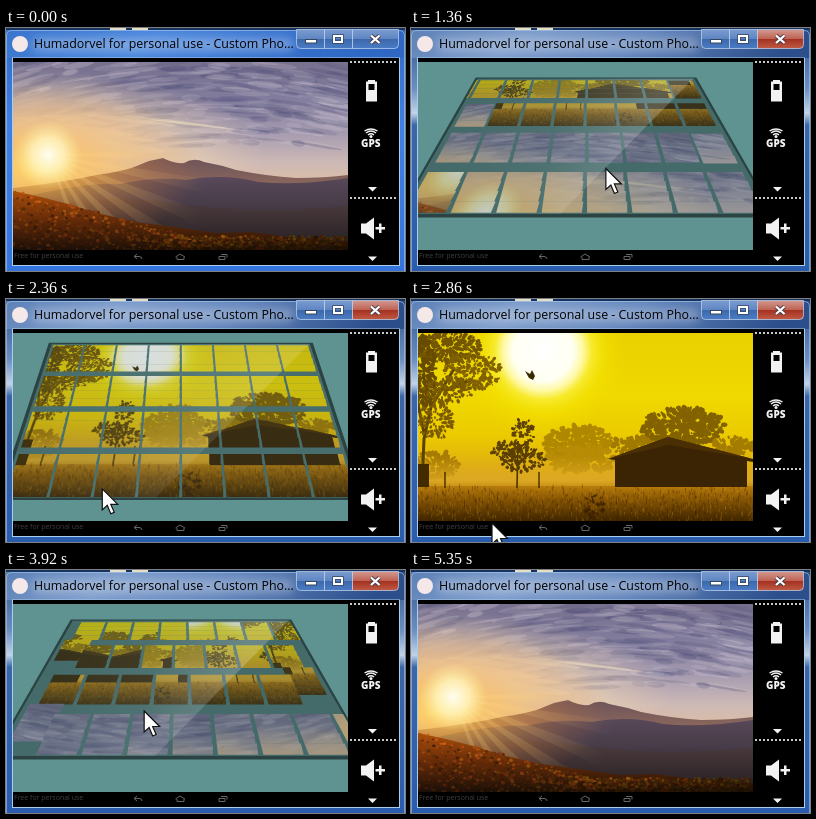
An HTML page with a canvas for the animation above (5.65 s loop, 399 by 243 pixels).

```html
<!DOCTYPE html>
<html lang="en">
<head>
<meta charset="utf-8">
<title>Tiled wallpaper switch</title>
<style>
  html, body { margin: 0; width: 100%; height: 100%; overflow: hidden; background: #000; }
  #stage { position: relative; width: 399px; height: 243px; overflow: hidden; }
  svg, canvas { position: absolute; left: 0; top: 0; display: block; }
  #screen { left: 7px; top: 34px; }
  text { font-family: "Open Sans", "Noto Sans", sans-serif; }
</style>
</head>
<body>
<div id="stage">
  <svg width="399" height="243" viewBox="0 0 399 243">
    <defs>
      <linearGradient id="calm" x2="1" y2="0.1">
        <stop offset="0" stop-color="#3a74cc"/><stop offset=".4" stop-color="#4a86dc"/>
        <stop offset=".75" stop-color="#3670cc"/><stop offset="1" stop-color="#2f68c4"/>
      </linearGradient>
      <linearGradient id="active" x2="1" y2="0.1">
        <stop offset="0" stop-color="#5c80b6"/><stop offset=".3" stop-color="#7d9ccb"/>
        <stop offset=".6" stop-color="#6486bc"/><stop offset="1" stop-color="#2c4f8c"/>
      </linearGradient>
      <linearGradient id="calmSide" x2="0" y2="1">
        <stop offset="0" stop-color="#2f69c4"/><stop offset=".4" stop-color="#3f80e6"/>
        <stop offset="1" stop-color="#3574dc"/>
      </linearGradient>
      <linearGradient id="side" x2="0" y2="1">
        <stop offset="0" stop-color="#2c4f8c"/><stop offset=".25" stop-color="#6c8fc2"/>
        <stop offset=".35" stop-color="#c3d3e8"/><stop offset=".4" stop-color="#3c66a8"/>
        <stop offset="1" stop-color="#2a5cae"/>
      </linearGradient>
      <linearGradient id="btn" x2="0" y2="1">
        <stop offset="0" stop-color="#7c9cd0"/><stop offset=".48" stop-color="#5f86c2"/>
        <stop offset=".5" stop-color="#3c68ac"/><stop offset="1" stop-color="#4a7cc4"/>
      </linearGradient>
      <linearGradient id="red" x2="0" y2="1">
        <stop offset="0" stop-color="#d39a92"/><stop offset=".48" stop-color="#bf6354"/>
        <stop offset=".5" stop-color="#a4301f"/><stop offset="1" stop-color="#bf5a44"/>
      </linearGradient>
      <filter id="soft" x="-10%" y="-100%" width="120%" height="300%"><feGaussianBlur stdDeviation="5"/></filter>
    </defs>
    <rect id="frame" width="399" height="243" fill="url(#calmSide)"/>
    <rect id="bar" width="399" height="30" fill="url(#calm)"/>
    <rect width="399" height="2" fill="#16335f"/>
    <path d="M104 1H148" stroke="#e6dfc8" stroke-width="2" stroke-dasharray="16 6"/>
    <path d="M.5 243V8Q.5 2.5 6 2.5H393Q398.500 2.500 398.500 8V243" fill="none" stroke="#a8cbf0" stroke-opacity=".6"/>
    <rect x="26" y="10" width="262" height="13" rx="6" fill="#fff" opacity=".3" filter="url(#soft)"/>
    <circle cx="14" cy="16" r="8" fill="#f4e8e8"/>
    <text x="28" y="20" font-size="12.400" fill="#000">Humadorvel for personal use - Custom Pho...</text>
    <g stroke="#c3d8f0" stroke-opacity=".7">
      <path d="M290.500 1.500H318.500V20.500H294.500Q290.500 20.500 290.500 16.500Z" fill="url(#btn)"/>
      <rect x="318.500" y="1.500" width="28" height="19" fill="url(#btn)"/>
      <path id="close" d="M346.500 1.500H392.500V16.500Q392.500 20.500 388.500 20.500H346.500Z" fill="url(#btn)"/>
    </g>
    <rect x="299.500" y="11.500" width="11" height="3.500" fill="#fff" stroke="#35465e"/>
    <rect x="328" y="8" width="8" height="6" fill="none" stroke="#35465e" stroke-width="3.500"/>
    <rect x="328" y="8" width="8" height="6" fill="none" stroke="#fff" stroke-width="2"/>
    <path d="M365 7.500l8.500 7.500m0-7.500l-8.500 7.500" stroke="#4a3c46" stroke-width="4.200"/>
    <path d="M365 7.500l8.500 7.500m0-7.500l-8.500 7.500" stroke="#fff" stroke-width="2.300"/>
    <rect x="6" y="29.500" width="388" height="208.500" fill="#a9cdec"/>
    <rect x="7" y="30" width="386" height="207" fill="#000"/>
    <path d="M344 34H392M344 170H392" stroke="#c9c9c9" stroke-width="2" stroke-dasharray="2 2"/>
    <g fill="#f2f2f2">
      <path d="M362 52h7v1.500h2v20h-11V53.500h2Z"/>
      <path d="M362 159h9l-4.500 4.500zM362 228.500h9l-4.500 4.500z"/>
      <path d="M355 195.500h5l8-6v22l-8-6h-5z"/>
      <path d="M369.500 199h3.500v-3.500h2.500v3.500h3.500v2.500h-3.500v3.500H373v-3.500h-3.500z"/>
      <circle cx="365" cy="108.500" r="1.500"/>
      <text x="364.800" y="118.500" font-size="10" font-weight="800" text-anchor="middle">GPS</text>
    </g>
    <path d="M362 107q3-2.500 6 0M360 105q5-4 10 0M358.500 103q6.500-4 13 0" fill="none" stroke="#f2f2f2" stroke-width="1.400"/>
    <rect x="362.500" y="56" width="6" height="6" fill="#000"/>
    <text x="8" y="230" font-size="7" fill="#404040">Free for personal use</text>
    <g fill="none" stroke="#666" stroke-width="1">
      <path d="M131 226l-3 2.500l3 2.500M128 228.500h5q3 0 3 2.500"/>
      <path d="M169.500 229l4.500-3l5 3M171 229v2.500h7V229"/>
      <path d="M213 228.500h6v3h-6zM215 226.500h6v3"/>
    </g>
  </svg>
  <canvas id="screen" width="335" height="188"></canvas>
  <svg width="399" height="243" viewBox="0 0 399 243">
    <path id="cursor" d="M0 0V21L5 16.500L8.500 25L12 23.500L8.500 15.500H15.500Z" fill="#fff" stroke="#111" stroke-width="1.200"/>
  </svg>
</div>
<script>
const W = 335, H = 188, LOOP = 5650, COLS = 8, TILES = 32;
const ctx = document.getElementById('screen').getContext('2d');
const lerp = (a, b, f) => a + (b - a) * f;
const $ = id => document.getElementById(id);

function rng(seed) {
  return () => (seed = (seed * 16807) % 2147483647) / 2147483647;
}

// Scenes are painted in stage coordinates.
function scene(paint) {
  const c = document.createElement('canvas');
  c.width = W; c.height = H;
  const g = c.getContext('2d');
  g.translate(-7, -34);
  paint(g);
  return c;
}
function wash(g, fill, y = 34, h = H) {
  g.fillStyle = fill;
  g.fillRect(7, y, W, h);
}
function stops(grad, list) {
  list.forEach(([o, c]) => grad.addColorStop(o, c));
  return grad;
}
const down = (g, y0, y1, list) => stops(g.createLinearGradient(0, y0, 0, y1), list);
const glow = (g, x, y, r, list) => stops(g.createRadialGradient(x, y, 0, x, y, r), list);
function blob(g, x, y, rx, ry, fill, turn = 0) {
  g.fillStyle = fill;
  g.beginPath();
  g.ellipse(x, y, rx, ry, turn, 0, 7);
  g.fill();
}
function land(g, d, fill) {
  g.fillStyle = fill;
  g.fill(new Path2D(d + 'V222H7Z'));
}
// A glow squeezed vertically around its centre.
function flare(g, x, y, r, squeeze, list) {
  g.save();
  g.translate(x, y);
  g.scale(1, squeeze);
  blob(g, 0, 0, r, r, glow(g, 0, 0, r, list));
  g.restore();
}

const sunrise = scene(g => {
  const r = rng(41), sun = [42, 127];
  wash(g, down(g, 34, 152, [[0, '#77708e'], [.3, '#817c9c'], [.6, '#a59bb0'], [.85, '#cdb9b6'], [1, '#d9bda8']]));
  for (let i = 0; i < 330; i++) {
    const x = 7 + r() * W, y = 34 + r() * 84;
    const tone = r() < .45 ? '214,204,216' : '74,74,116';
    blob(g, x, y, 7 + r() * 20, .8 + r() * 2.4, `rgba(${tone},${.1 + r() * .2})`, lerp(-.3, .22, (x - 7) / W));
  }
  for (let i = 0; i < 14; i++)
    blob(g, 20 + r() * 190, 88 + r() * 35, 25 + r() * 35, 1 + r() * 3, 'rgba(255,240,205,.3)', .12);
  flare(g, 45, 125, 215, .36, [[0, '#fffdf0'], [.3, 'rgba(255,247,218,.95)'], [.6, 'rgba(255,229,184,.5)'], [1, 'rgba(255,215,170,0)']]);
  flare(g, 30, 100, 125, .5, [[0, 'rgba(255,240,205,.5)'], [1, 'rgba(255,220,170,0)']]);
  land(g, 'M7 160Q60 154 90 147Q120 143 133 137L143 133L157 130Q168 136 178 135Q188 129 198 134Q215 137 230 142Q260 148 290 150Q320 150 342 147', down(g, 130, 190, [[0, '#6b525a'], [.5, '#8f6a5c'], [1, '#735347']]));
  land(g, 'M7 172Q75 154 115 156Q148 148 180 152Q218 145 252 154Q292 158 342 150', down(g, 148, 215, [[0, '#59485a'], [.4, '#483d49'], [1, '#29242b']]));
  land(g, 'M7 182Q90 164 160 174Q240 187 342 178', down(g, 166, 222, [[0, 'rgba(82,62,62,.7)'], [1, '#231e22']]));
  flare(g, 30, 140, 165, .5, [[0, 'rgba(255,214,98,.95)'], [.35, 'rgba(240,165,62,.62)'], [.7, 'rgba(205,125,60,.3)'], [1, 'rgba(190,110,60,0)']]);
  for (let i = 0; i < 7; i++) {
    const a = -.05 + i * .2;
    g.fillStyle = glow(g, ...sun, 165, [[0, 'rgba(255,224,130,.3)'], [1, 'rgba(255,200,110,0)']]);
    g.beginPath();
    g.moveTo(...sun);
    g.arc(...sun, 165, a, a + .09);
    g.fill();
  }
  blob(g, ...sun, 34, 34, glow(g, ...sun, 34, [[0, '#fffef2'], [.5, 'rgba(255,246,190,.8)'], [1, 'rgba(255,235,150,0)']]));
  land(g, 'M7 163L35 169L62 176L95 186L130 194L175 200L210 205L245 204L290 210L342 213', down(g, 163, 222, [[0, '#ac500a'], [.45, '#6b2d08'], [1, '#1a0f08']]));
  for (let i = 0; i < 1100; i++) {
    const x = 7 + r() * W, side = (x - 7) / W;
    const top = 162 + 46 * Math.min(1, side * 1.9), depth = r();
    const y = lerp(top, 222, depth), s = .6 + r() * 1.6;
    const light = (1 - .65 * side) * (1 - .75 * depth) * (.3 + r() * .8);
    const hue = lerp(20, 38, r() * (.3 + side));
    blob(g, x, y, s, s * .8, `hsl(${hue},82%,${4 + 42 * light}%)`);
  }
});

const golden = scene(g => {
  const r = rng(77);
  wash(g, down(g, 34, 190, [[0, '#e9d000'], [.4, '#f0d900'], [.65, '#eccb00'], [.85, '#e0b010'], [1, '#d9a426']]));
  blob(g, 132, 52, 84, 84, glow(g, 132, 52, 84, [[0, '#fff'], [.36, '#fffff2'], [.47, '#fff9a8'], [.58, '#f7ea2c'], [.75, 'rgba(243,226,0,.6)'], [1, 'rgba(240,217,0,0)']]));
  const crown = (x, y, rx, ry, n, size, fill) => {
    for (let i = 0; i < n; i++) {
      const a = r() * 6.283, d = Math.sqrt(r()), s = size * (.5 + r());
      blob(g, x + rx * d * Math.cos(a), y + ry * d * Math.sin(a), s, s * .7, fill, a);
    }
  };
  const trunk = (d, w, fill) => {
    g.strokeStyle = fill; g.lineWidth = w;
    g.stroke(new Path2D(d));
  };
  crown(168, 144, 34, 18, 330, 2.4, '#b08800');
  crown(170, 160, 34, 14, 150, 3, '#b88c06');
  crown(272, 128, 42, 20, 420, 2.4, '#836200');
  crown(322, 147, 22, 9, 100, 2.4, '#a47c00');
  crown(222, 147, 22, 10, 110, 2.4, '#a07a00');
  crown(25, 166, 23, 14, 160, 2.2, '#a87c04');
  wash(g, down(g, 158, 192, [[0, 'rgba(222,170,30,0)'], [.7, 'rgba(220,168,36,.85)'], [1, '#b67c0c']]), 158, 34);
  wash(g, down(g, 187, 222, [[0, '#b87c0a'], [.35, '#8a5804'], [1, '#3f2500']]), 187, 35);
  for (let i = 0; i < 1000; i++) {
    const x = 7 + r() * W, y = 189 + r() * 34;
    g.fillStyle = r() < .45 ? 'rgba(206,142,22,.35)' : 'rgba(56,30,0,.4)';
    g.fillRect(x, y, .8, -1 - r() * 4);
  }
  crown(183, 208, 10, 13, 45, 1.5, 'rgba(58,32,0,.7)');
  trunk('M11 188L13 140L20 108L43 70M13 134L7 105M20 108L12 75M33 92L62 80', 3, '#5c4200');
  crown(36, 48, 34, 16, 330, 1.9, '#745600');
  crown(13, 74, 12, 38, 240, 2, '#674b00');
  crown(62, 72, 29, 19, 230, 1.7, '#816100');
  crown(36, 92, 25, 13, 150, 1.7, '#7a5b00');
  crown(24, 122, 19, 18, 120, 1.7, '#7c5b00');
  g.fillStyle = '#432b00';
  g.fillRect(7, 165, 11, 23);
  trunk('M106 189L107 142M106 172L88 157M106 164L126 150M107 150L120 140', 1.6, '#4d3300');
  crown(112, 135, 11, 16, 75, 1.6, '#5e4200');
  crown(96, 150, 17, 8, 65, 1.6, '#5e4200');
  crown(112, 161, 22, 12, 120, 1.6, '#5a3e00');
  g.fillStyle = '#3a2404';
  g.fill(new Path2D('M197 160L257 138L342 160V163L336 162V188H204V161Z'));
  g.fillStyle = '#4a2f04';
  g.fill(new Path2D('M197 160L257 138L342 160L258 146Z'));
  trunk('M34 189V173M128 189V173', 1.3, '#3b2500');
  g.fillStyle = '#3a2a00';
  g.fill(new Path2D('M114 72L119 75L121 71L124 77L122 81L118 79Z'));
});

// Piecewise linear track: rows of [time, ...values].
function track(t, keys) {
  if (t <= keys[0][0]) return keys[0].slice(1);
  for (let i = 1; i < keys.length; i++) {
    const [a, b] = [keys[i - 1], keys[i]];
    if (t <= b[0]) return a.slice(1).map((v, j) => lerp(v, b[j + 1], (t - a[0]) / (b[0] - a[0])));
  }
  return keys[keys.length - 1].slice(1);
}
const TILT = [[180, 0], [760, 1], [2080, 1], [2780, 0], [3220, 0], [3700, 1], [4620, 1], [5300, 0]];
const SHIFT = [[750, 32], [860, 29.25], [1860, 4.75], [2060, 0], [3680, 0], [3920, 8.2], [4420, 25.4], [4610, 32]];
const POINTER = [[300, 399, 243], [760, 275, 158], [860, 255, 155], [1860, 135, 126], [1960, 125, 125],
  [2560, 82, 222], [2860, 81, 224], [3200, 84, 221], [3300, 100, 162], [3920, 138, 141],
  [4420, 219, 141], [4520, 224, 134], [4900, 190, -30]];

// The conveyor winds through the grid row by row.
function cell(i) {
  const row = Math.floor(i / COLS), c = i % COLS;
  return [row % 2 ? COLS - 1 - c : c, row];
}
function place(p) {
  if (p <= 0) return [p, 0];
  if (p >= TILES - 1) return [TILES - 1 - p, 3];
  const a = cell(Math.floor(p)), b = cell(Math.ceil(p)), f = p % 1;
  return [lerp(a[0], b[0], f), lerp(a[1], b[1], f)];
}

function projector(tilt) {
  const a = lerp(167.5, 108, tilt), b = lerp(167.5, 186, tilt);
  const top = lerp(34, 50, tilt), bottom = lerp(222, 186, tilt);
  return (u, v) => {
    const w = 1 / lerp(1 / a, 1 / b, v);
    const f = b - a < .01 ? v : (w - a) / (b - a);
    return [lerp(174.5, 175, tilt) + (u - .5) * 2 * w - 7, lerp(top, bottom, f) - 34];
  };
}
function quad(points) {
  const path = new Path2D();
  points.forEach(([x, y]) => path.lineTo(x, y));
  path.closePath();
  return path;
}

function drawTile(pic, from, at, tilt, P) {
  const step = lerp(.125, .1227, tilt), width = step * lerp(1, .9, tilt);
  const u = lerp(0, .009, tilt) + at[0] * step + (step - width) / 2;
  const v = lerp(0, .027, tilt) + at[1] * lerp(.25, .2555, tilt);
  const height = lerp(.25, .201, tilt), n = 4;
  const sw = W / COLS, sh = H / 4 / n;
  for (let j = 0; j < n; j++) {
    const v0 = v + height * j / n, v1 = v + height * (j + 1) / n;
    const a = P(u, v0), b = P(u + width, v0), c = P(u, v1), d = P(u + width, v1);
    const w = (b[0] - a[0] + d[0] - c[0]) / 2;
    ctx.setTransform(w / sw, 0, (c[0] - a[0]) / sh, (c[1] - a[1]) / sh, a[0], a[1]);
    ctx.drawImage(pic, from[0] * sw, from[1] * H / 4 + j * sh, sw, sh, 0, 0, sw, sh + (j < n - 1 ? .4 : 0));
  }
  ctx.setTransform(1, 0, 0, 1, 0, 0);
}

function drawBoard(tilt, shift, mirrored) {
  const P = projector(tilt);
  const flip = ([c, row]) => [mirrored ? COLS - 1 - c : c, row];
  ctx.fillStyle = '#5f9391';
  ctx.fillRect(0, 0, W, H);
  const foot = 3.5 * tilt;
  const [bl, br] = [P(-.012, 1), P(1.012, 1)];
  ctx.fillStyle = '#2b4443';
  ctx.fill(quad([P(-.012, -.006), P(1.012, -.006), [br[0], br[1] + foot], [bl[0], bl[1] + foot]]));
  const face = quad([P(0, .006), P(1, .006), P(1, 1), P(0, 1)]);
  ctx.save();
  ctx.clip(face);
  ctx.fillStyle = '#4d7574';
  ctx.fill(face);
  for (let i = 0; i < TILES * 2; i++) {
    const p = i - shift;
    if (p <= -1 || p >= TILES) continue;
    drawTile(i < TILES ? golden : sunrise, flip(cell(i % TILES)), flip(place(p)), tilt, P);
  }
  ctx.globalAlpha = .3 * tilt;
  ctx.fillStyle = '#2f5050';
  ctx.fill(face);
  // Glass sheen, brightest along its diagonal edge.
  const tl = P(0, 0), edge = P(.72, .5);
  ctx.globalAlpha = tilt;
  ctx.fillStyle = stops(ctx.createLinearGradient(tl[0], tl[1], edge[0], edge[1]),
    [[0, 'rgba(255,255,255,0)'], [.5, 'rgba(255,255,255,.05)'], [1, 'rgba(255,255,255,.2)']]);
  ctx.fill(quad([tl, P(1, 0), P(.43, 1), P(0, 1)]));
  ctx.restore();
}

function render(t) {
  const [raw] = track(t, TILT), [shift] = track(t, SHIFT), [x, y] = track(t, POINTER);
  const tilt = raw * raw * (3 - 2 * raw);
  if (tilt > 0) drawBoard(tilt, shift, t > 3000);
  else ctx.drawImage(shift > 16 ? sunrise : golden, 0, 0);
  const active = t >= 200;
  $('frame').setAttribute('fill', active ? 'url(#side)' : 'url(#calmSide)');
  $('bar').setAttribute('fill', active ? 'url(#active)' : 'url(#calm)');
  $('close').setAttribute('fill', active ? 'url(#red)' : 'url(#btn)');
  $('cursor').setAttribute('transform', `translate(${x} ${y})`);
  $('cursor').style.display = t > 300 && t < 4900 ? '' : 'none';
}

const start = performance.now();
function tick() {
  render((performance.now() - start) % LOOP);
  requestAnimationFrame(tick);
}
tick();
</script>
</body>
</html>
```
